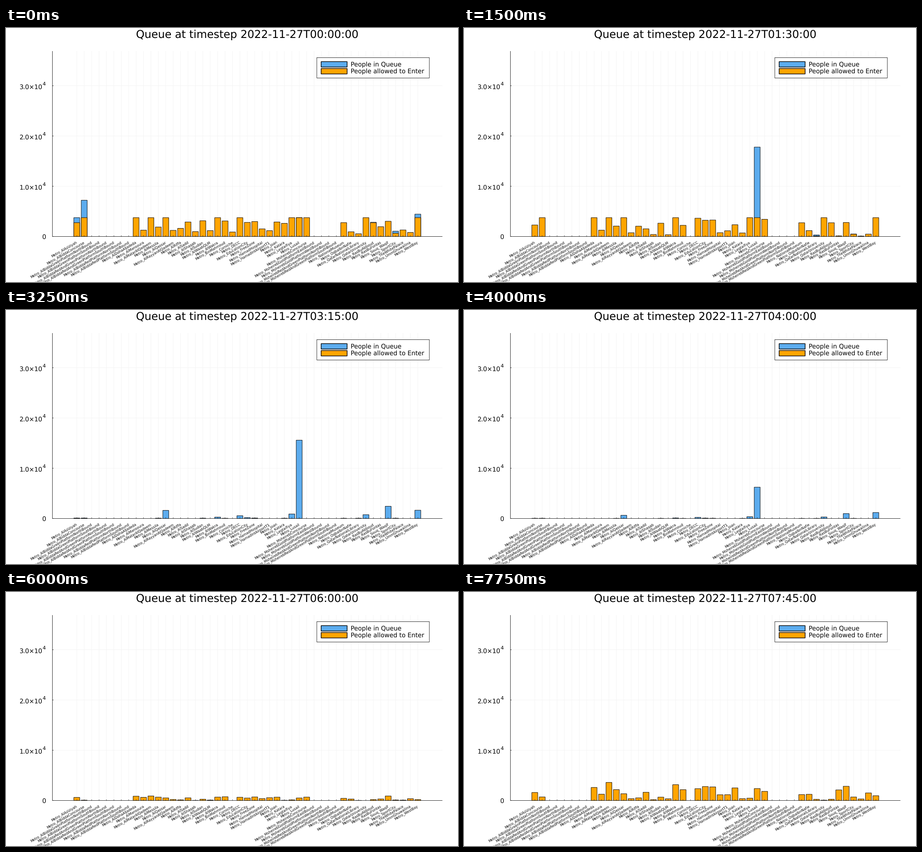
These frames come from a looping animation (998 by 561 pixels, 8000 ms). A matplotlib script:

```python
import numpy as np
import matplotlib.pyplot as plt
from matplotlib.animation import FuncAnimation
from matplotlib.patches import Rectangle

W, H, DPI = 998, 561, 64
STEPS, STEP_MS = 32, 250
LEFT, RIGHT, TOP, BASE = 102.4, 963.6, 51, 460.5
FIRST_X, GAP = 156.3, 16.37
PX_PER_PERSON = 111 / 10000
BLUE, ORANGE = "#5CACEE", "#FFA500"
GRID = "#f2f2f2"

plt.rcParams.update({"font.family": "DejaVu Sans", "text.hinting": "none",
                     "path.snap": False})


def platforms(hub, lines):
    return [f"{hub}{line}Bound" for line in lines]


STATIONS = [
    "AlAziziyah", "AlBiddaConcourse",
    *platforms("AlBidda", [
        "GreenPlatformNorth", "GreenPlatformSouth",
        "RedAndGreenPlatformNorth", "RedAndGreenPlatformSouth",
        "RedPlatformNorth", "RedPlatformSouth"]),
    "AlDohaAlJadeda", "AlMansoura", "AlMatarAlQadeem", "AlMessila",
    "AlQassar", "AlRayyanAlQadeem", "AlRiffa", "AlSadd", "AlShaqab",
    "AlSudan", "AlWaabQLM", "AlWakra", "BinMahmoud", "Corniche", "DECC",
    "EducationCity", "FreeZone", "HamadHospital", "HamadIntAirportT1",
    "Joan", "Katara", "Legtaifiya", "Lusail", "MsheirebConcourse",
    *platforms("Msheireb", [
        "GoldPlatformEast", "GoldPlatformWest",
        "RedAndGreenPlatformNorth", "RedAndGreenPlatformSouth"]),
    "NationalMuseum", "OqbaIbnNafie", "QatarNationalLibrary",
    "QatarUniversity", "RasBuAbboud", "RasBuFontas", "Souq_Waqif",
    "SportCity", "TheWhitePalace", "UmmGhuwailina", "WestBay",
]
N = len(STATIONS)
ENTRANCES = [i for i, s in enumerate(STATIONS) if not s.endswith("Bound")]
FULL = 3750  # most people a station lets in per step


def entering(counts):
    """People let in at each entrance; platforms have none."""
    row = np.zeros(N)
    row[ENTRANCES] = counts
    return row


def queue(**people):
    row = np.zeros(N)
    for name, count in people.items():
        row[STATIONS.index(name)] = count
    return row


midnight = entering([
    2750, FULL, FULL, 1270, FULL, 1880, FULL, 1220, 1620, 2890, 970, 3130,
    1180, FULL, 3100, 890, FULL, 2810, 2970, 1510, 1160, 2890, 2620, FULL,
    FULL, FULL, 2760, 940, 550, FULL, 2750, 1950, 3030, 650, 1300, 800, FULL])
late = entering([
    2290, FULL, FULL, 1260, FULL, 2080, FULL, 750, 2050, 1520, 400, 2650,
    350, FULL, 2220, 0, 3640, 3230, 3280, 760, 1140, 2340, 700, FULL,
    FULL, 3420, 2740, 1180, 100, FULL, 2740, 130, 2780, 460, 80, 480, FULL])
closing = entering([
    2740, 3010, 2150, 1260, FULL, 790, FULL, 350, 710, 1310, 90, 1310,
    120, FULL, 2380, 0, 2880, 2920, 2090, 330, 1140, 1210, 400, FULL,
    FULL, 1930, 1750, 490, 150, FULL, 100, 180, 2780, 30, 50, 400, FULL])
dawn = entering([
    1220, 120, 1710, 1250, 1790, 1340, 1020, 410, 260, 1040, 40, 490,
    160, 1350, 1500, 0, 1300, 980, 1400, 780, 1130, 1330, 80, 260,
    1000, 1350, 850, 590, 30, 0, 350, 620, 1780, 220, 140, 730, 350])
morning = entering([
    1590, 700, 2590, 1250, 3590, 2170, 1340, 370, 520, 1640, 160, 670,
    340, 3150, 2150, 0, 2360, 2770, 2700, 1140, 1150, 2500, 380, 470,
    2380, 1820, 1180, 1230, 230, 60, 240, 2110, 2830, 690, 310, 1500, 950])
closed = np.zeros(N)

ENTER_KEYS = {0: midnight, 6: late, 9: closing, 11: 0.85 * closing,
              12: closed, 23: closed, 24: 0.5 * dawn, 27: dawn, 31: morning}
QUEUE_KEYS = {
    0: queue(AlAziziyah=FULL, AlBiddaConcourse=7220, Lusail=FULL,
             RasBuAbboud=2830, SportCity=1050, WestBay=4450),
    6: queue(Lusail=17790, QatarNationalLibrary=310, SportCity=490),
    9: queue(Lusail=24830, TheWhitePalace=110),
    13: queue(AlAziziyah=90, AlBiddaConcourse=100, AlMessila=60,
              AlQassar=1610, AlSudan=60, AlWakra=280, BinMahmoud=40, DECC=560,
              EducationCity=170, FreeZone=100, Katara=50, Legtaifiya=890,
              Lusail=15590, NationalMuseum=40, QatarNationalLibrary=50,
              QatarUniversity=760, Souq_Waqif=2430, SportCity=50,
              WestBay=1650),
    18: queue(WestBay=890),
    19: queue(WestBay=700),
    22: closed,
}


def at_step(keys, step):
    times = list(keys)
    rows = np.array([keys[t] for t in times])
    return np.array([np.interp(step, times, col) for col in rows.T])


fig = plt.figure(figsize=(W / DPI, H / DPI), dpi=DPI, facecolor="white")
ax = fig.add_axes([0, 0, 1, 1])
ax.set_xlim(0, W)
ax.set_ylim(H, 0)
ax.axis("off")


def pt(px):
    return px * 72 / DPI


def label(x, y, s, size, **kw):
    return ax.text(x, y, s, fontsize=pt(size), color="black",
                   va="baseline", **kw)


def lines(xs, ys, color="black", width=0.8, z=4):
    ax.plot(xs, ys, color=color, lw=pt(width), zorder=z,
            solid_capstyle="butt")


def box(x, y, w, h, face, edge="black", width=0.9, z=3):
    return ax.add_patch(Rectangle((x, y), w, h, facecolor=face,
                                  edgecolor=edge, lw=pt(width), zorder=z))


centers = FIRST_X + GAP * np.arange(N)

# Axes, grid and tick labels
for x, name in zip(centers, STATIONS):
    lines([x, x], [TOP, BASE], GRID, z=1)
    lines([x, x], [BASE - 2.5, BASE], width=0.6)
    label(x + 1.3, 474.5, "Metro_" + name, 7.6, ha="right",
          rotation=30, rotation_mode="anchor")

for k in range(4):
    y = BASE - 111 * k
    lines([LEFT, LEFT + 2.5], [y, y])
    if k:
        lines([LEFT, RIGHT], [y, y], GRID, z=1)
        label(80.8, y + 7, f"{k}.0×10", 13.75, ha="right")
        label(80.4, y - 0.8, "4", 11)
    else:
        label(88.3, y + 4.9, "0", 13.75, ha="right")

lines([LEFT, RIGHT], [BASE, BASE])
lines([LEFT, LEFT], [TOP, BASE])

# Legend
box(686.2, 65.4, 248.6, 45, "white", "black", 0.8, z=5)
for y, color, text in [(74.3, BLUE, "People in Queue"),
                       (89.5, ORANGE, "People allowed to Enter")]:
    box(695.8, y, 57.4, 12, color, width=1.4, z=6)
    label(761, y + 11, text, 13.75, zorder=6)

title = label((LEFT + RIGHT) / 2, 21.5, "", 23.9, ha="center")


def make_bars(color, z):
    return [box(x - 0.4 * GAP, BASE, 0.8 * GAP, 0, color, z=z)
            for x in centers]


queue_bars = make_bars(BLUE, 2)
enter_bars = make_bars(ORANGE, 3)


def set_bars(bars, people):
    for bar, count in zip(bars, people):
        bar.set_height(-count * PX_PER_PERSON)
        bar.set_visible(count > 1)


def draw(step):
    hour, quarter = divmod(step, 4)
    title.set_text(
        f"Queue at timestep 2022-11-27T{hour:02d}:{15 * quarter:02d}:00")
    set_bars(queue_bars, at_step(QUEUE_KEYS, step))
    set_bars(enter_bars, at_step(ENTER_KEYS, step))
    return [title, *queue_bars, *enter_bars]


anim = FuncAnimation(fig, draw, frames=STEPS, interval=STEP_MS,
                     repeat=True, repeat_delay=0, blit=False)
plt.show()
```
